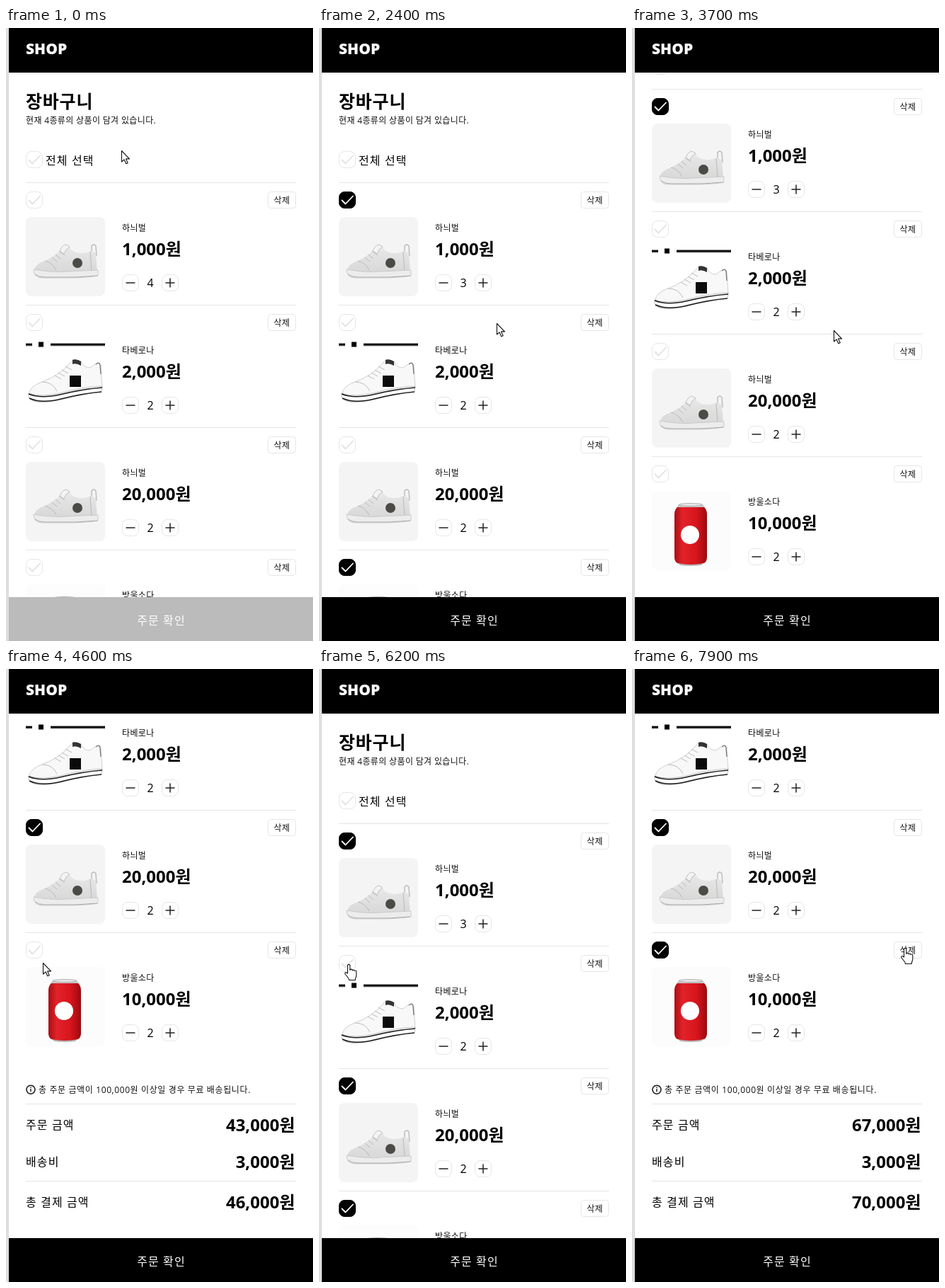
Recreate the animation shown at these times as an HTML page. Size 434 px wide and 866 px high, loop 8 s.

```html
<!DOCTYPE html>
<html lang="ko">
<head>
<meta charset="utf-8">
<title>장바구니</title>
<style>
  html, body { margin: 0; width: 100%; height: 100%; overflow: hidden; background: #fff; }
  svg { display: block; width: 434px; height: 866px; }
  text { font: 16px "Open Sans", "Noto Sans CJK KR", "Noto Sans CJK", sans-serif; white-space: pre; }
  .brand { font-size: 21px; font-weight: 800; fill: #fff; }
  .title { font-size: 25px; font-weight: 700; letter-spacing: .8px; }
  .small { font-size: 12px; letter-spacing: .35px; fill: #111; }
  .note { letter-spacing: .62px; }
  .label { letter-spacing: 1.1px; }
  .strong { font-weight: 500; }
  .price { font-size: 24px; font-weight: 700; }
  .mid { text-anchor: middle; }
  .end { text-anchor: end; }
  .edge { fill: #fff; stroke: #e6e6e6; }
  .rule { fill: #e5e5e5; }
  .icon { fill: none; stroke: #222; stroke-width: 1.5; }
  .check rect { fill: #fff; stroke: #e6e6e6; }
  .check path { fill: none; stroke: #e2e2e2; stroke-width: 1.8; stroke-linecap: round; stroke-linejoin: round; }
  .check.on rect { fill: #000; stroke: #000; }
  .check.on path { stroke: #fff; }
  #cursor path { fill: #fff; stroke: #111; stroke-width: 1.1; stroke-linejoin: round; }
</style>
</head>
<body>
<svg viewBox="0 0 434 866">
  <defs>
    <linearGradient id="metal">
      <stop offset="0" stop-color="#a90d12"/><stop offset=".25" stop-color="#e3222a"/>
      <stop offset=".7" stop-color="#d5141b"/><stop offset="1" stop-color="#9a0a10"/>
    </linearGradient>
    <linearGradient id="upper" x2="0" y2="1">
      <stop offset="0" stop-color="#e9e9e9"/><stop offset="1" stop-color="#d6d6d6"/>
    </linearGradient>

    <g id="runner">
      <rect width="112" height="112" rx="8" fill="#f4f4f4"/>
      <path d="M93 51V41q3-4 6 0l1 14" fill="none" stroke="#bdbdbd" stroke-width="1.5"/>
      <path d="M12 74q2-8 15-12Q38 57 48 48q3-7 9-9l5 3q2 6 9 8 12 3 21-2l7 3 2 27-35 5H14z" fill="url(#upper)"/>
      <path d="M37 57l7 6M42 53l7 6M47 48l8 6M27 62q10 2 16 13M91 49l2 28" fill="none" stroke="#b9b9b9"/>
      <path d="M48 48q4-9 9-9l5 3q-6 3-8 10z" fill="#f3f3f3" stroke="#b5b5b5" stroke-width=".8"/>
      <path d="M11 74q28 5 48 3l43-2v8q-16 3-46 3H22q-11-1-11-12z" fill="#ececec" stroke="#c4c4c4" stroke-width=".8"/>
      <path d="M13 81q5 4 14 4h44l30-2" fill="none" stroke="#a9a9a9"/>
      <circle cx="73" cy="65" r="7" fill="#4b4a45"/>
    </g>

    <g id="court">
      <rect y="5" width="112" height="4.5" fill="#999"/>
      <rect y="6" width="112" height="2.5" fill="#0a0a0a"/>
      <rect x="9" y="3" width="26" height="9" fill="#fff"/>
      <rect x="18" y="3.5" width="7" height="7" fill="#000"/>
      <path d="M5 77q0-11 20-18 20-7 36-24l6-7 11 3q3 9 13 9 5-5 12-7l3 3 2 32q-40 9-62 17-30 8-41-1z" fill="#f8f8f8" stroke="#cfcfcf"/>
      <path d="M99 35q5-4 6 1l1 13" fill="none" stroke="#777" stroke-width="1.3"/>
      <path d="M66 29q6-2 12 2v6q-7-4-12-2z" fill="#333"/>
      <path d="M41 51l9 5M46 47l9 5M51 43l9 5M56 38l9 5M23 60q15 0 21 13" fill="none" stroke="#bbb"/>
      <path d="M4 76q17 6 44 0 33-9 60-10l-1 8q-32 4-57 11-40 8-46-4z" fill="#fff" stroke="#aaa" stroke-width=".7"/>
      <path d="M4 77q17 7 44 1 33-8 60-10M5 83q17 8 45 1 32-8 57-10" fill="none" stroke="#1c1c1c" stroke-width="1.6"/>
      <rect x="62" y="51" width="16" height="16" fill="#0b0b0b"/>
    </g>

    <g id="can">
      <rect width="112" height="112" rx="8" fill="#fcfcfc"/>
      <path d="M38 19h34l5 7H33z" fill="#c9c9c9"/>
      <ellipse cx="55" cy="19.5" rx="17" ry="2" fill="#e6e6e6" stroke="#999" stroke-width=".7"/>
      <path d="M36 100h38l-4 5q-15 2-30 0z" fill="#b8b8b8"/>
      <path d="M36 23h38q4 4 4 10v61q0 5-4 8-19 4-38 0-4-3-4-8V33q0-6 4-10z" fill="url(#metal)"/>
      <circle cx="54" cy="62" r="13" fill="#fff"/>
    </g>

    <path id="info" d="M35 588.2a6 6 0 1 1-.01 0M35 593v4.2M35 590.4v1.5"/>
  </defs>

  <rect width="434" height="866" fill="#fff"/>
  <g id="page"></g>
  <rect width="434" height="63"/>
  <text class="brand" x="28" y="37">SHOP</text>
  <rect id="bar" y="804" width="434" height="62"/>
  <text class="label strong mid" x="219.5" y="843" fill="#fff">주문 확인</text>
  <rect width="4" height="866" fill="#dedede"/>
  <g id="cursor">
    <path id="arrow" d="M.5.5V16l3.6-3.2 2.7 6 2.4-1-2.6-5.9h4.9z"/>
    <path id="hand" transform="translate(-6)" d="M4.5 13V2a1.6 1.6 0 0 1 3.3 0v6.5a1.6 1.6 0 0 1 3.2.4 1.6 1.6 0 0 1 3 .6 1.6 1.6 0 0 1 2.8 1v5c0 3-1.6 4-1.6 7H6.5c0-2.5-2-4-5.5-8.5-1.2-1.8.8-3.2 2.2-1.8z"/>
  </g>
</svg>

<script>
const LOOP = 8000, STEP = 100, ITEM_TOP = 218, ITEM_H = 173, END = 365;
const SHIP = 3000, FREE_FROM = 100000;
const items = [
  { name: '하늬벌', price: 1000, qty: 4, art: 'runner' },
  { name: '타베로나', price: 2000, qty: 2, art: 'court' },
  { name: '하늬벌', price: 20000, qty: 2, art: 'runner' },
  { name: '방울소다', price: 10000, qty: 2, art: 'can' }
];

// [time, action]: a number toggles that item
const clicks = [
  [400, 'all'], [1100, 1], [1400, 2], [2100, 'minus'],
  [3100, 3], [4000, 2], [4800, 3], [6300, 1]
];
// [time, offset]
const scrollKeys = [
  [0, 0], [2400, 0], [2700, END], [3600, END], [3700, 132], [3800, 0], [4200, 0],
  [4500, END], [5400, END], [5700, 0], [6400, 0], [6800, END], [LOOP, END]
];
// [time, x, y]
const cursorKeys = [
  [0, 163, 173], [100, 120, 150], [300, 42, 182], [500, 42, 184], [800, 34, 291],
  [1000, 40, 412], [1100, 41, 414], [1400, 41, 586], [1500, 60, 640], [1700, 380, 745],
  [2000, 177, 358], [2100, 177, 358], [2400, 251, 417], [2700, 255, 430],
  [3000, 42, 396], [3100, 42, 396], [3400, 380, 743], [3600, 285, 427], [3700, 285, 427],
  [3900, 42, 586], [4100, 42, 586], [4400, 90, 480], [4600, 52, 415], [4700, 42, 396],
  [4900, 42, 396], [5100, 382, 743], [5400, 280, 440], [5700, 250, 430], [6000, 60, 425],
  [6200, 42, 417], [6400, 42, 417], [6700, 120, 450], [7100, 340, 640], [7300, 380, 740],
  [7500, 260, 835], [7700, 370, 560], [7900, 386, 394], [LOOP, 386, 394]
];

const $ = id => document.getElementById(id);
const won = n => n.toLocaleString('en-US') + '원';
const text = (cls, x, y, str, id = '') => `<text class="${cls}" x="${x}" y="${y}" id="${id}">${str}</text>`;
const rule = y => `<rect class="rule" x="28" y="${y}" width="382" height="1"/>`;
const button = (x, y, w, r) => `<rect class="edge" x="${x + .5}" y="${y + .5}" width="${w - 1}" height="23" rx="${r}"/>`;
const check = (id, y) => `<g class="check" id="${id}" transform="translate(28 ${y})">
  <rect x=".5" y=".5" width="23" height="23" rx="7.5"/><path d="M4.5 12.5l5 5L20 6.5"/></g>`;

function itemMarkup(item, i) {
  const y = ITEM_TOP + i * ITEM_H;
  return rule(y) + check('check' + i, y + 13)
    + button(370, y + 13, 40, 4) + text('small mid', 390, y + 29.5, '삭제')
    + `<use href="#${item.art}" x="28" y="${y + 49}"/>`
    + text('small', 164, y + 68.5, item.name)
    + text('price', 164, y + 103, won(item.price))
    + button(164, y + 130, 24, 7.5) + button(220, y + 130, 24, 7.5)
    + `<path class="icon" d="M169.5 ${y + 142}h13M225.5 ${y + 142}h13m-6.5-6.5v13"/>`
    + text('mid', 204, y + 148, item.qty, 'qty' + i);
}

const sumRow = (label, y, id) => text('label strong', 28, y + 6, label) + text('price end', 408.5, y + 9, '', id);

$('page').innerHTML =
  text('title', 28, 113, '장바구니')
  + text('small', 28, 134.5, '현재 4종류의 상품이 담겨 있습니다.')
  + check('checkAll', 174) + text('label', 56, 193, '전체 선택')
  + items.map(itemMarkup).join('')
  + `<g transform="translate(0 ${END})"><use href="#info" class="icon"/>`
  + text('small note', 46, 598.5, '총 주문 금액이 100,000원 이상일 경우 무료 배송됩니다.')
  + rule(614) + sumRow('주문 금액', 644, 'sum') + sumRow('배송비', 696, 'ship')
  + rule(723) + sumRow('총 결제 금액', 753, 'total') + '</g>';

function at(keys, t) {
  const n = Math.max(1, keys.findIndex(k => k[0] > t));
  const a = keys[n - 1], b = keys[n], p = (t - a[0]) / (b[0] - a[0]);
  return a.slice(1).map((v, i) => v + (b[i + 1] - v) * p);
}

function cartAt(t) {
  const on = items.map(() => false), qty = items.map(i => i.qty);
  for (const [time, what] of clicks) {
    if (time > t) break;
    if (what === 'all') on.fill(true);
    else if (what === 'minus') qty[0]--;
    else on[what] = !on[what];
  }
  return { on, qty };
}

function overButton(x, y, scroll) {
  if (y >= 804) return true;
  const within = (a, b) => x >= a && x <= b;
  const py = y + scroll, row = (py - ITEM_TOP) % ITEM_H;
  if (py < ITEM_TOP) return py >= 174 && py <= 198 && within(28, 52);
  if (py > ITEM_TOP + 4 * ITEM_H) return false;
  if (row >= 13 && row <= 37) return within(28, 52) || within(370, 410);
  return row >= 130 && row <= 154 && (within(164, 188) || within(220, 244));
}

function draw(t) {
  const { on, qty } = cartAt(t);
  const [scroll] = at(scrollKeys, t), [x, y] = at(cursorKeys, t);
  const sum = items.reduce((s, item, i) => s + (on[i] ? item.price * qty[i] : 0), 0);
  const ship = sum > 0 && sum < FREE_FROM ? SHIP : 0;

  on.forEach((v, i) => {
    $('check' + i).classList.toggle('on', v);
    $('qty' + i).textContent = qty[i];
  });
  $('checkAll').classList.toggle('on', on.every(Boolean));
  $('sum').textContent = won(sum);
  $('ship').textContent = won(ship);
  $('total').textContent = won(sum + ship);
  $('bar').setAttribute('fill', on.some(Boolean) ? '#000' : '#bbb');
  $('page').setAttribute('transform', `translate(0 ${-Math.round(scroll)})`);

  const hand = overButton(x, y, scroll);
  $('hand').style.display = hand ? '' : 'none';
  $('arrow').style.display = hand ? 'none' : '';
  $('cursor').setAttribute('transform', `translate(${Math.round(x)} ${Math.round(y)})`);
}

const start = performance.now();
function tick() {
  const t = (performance.now() - start) % LOOP;
  draw(Math.floor(t / STEP) * STEP);
  requestAnimationFrame(tick);
}
tick();
</script>
</body>
</html>
```
